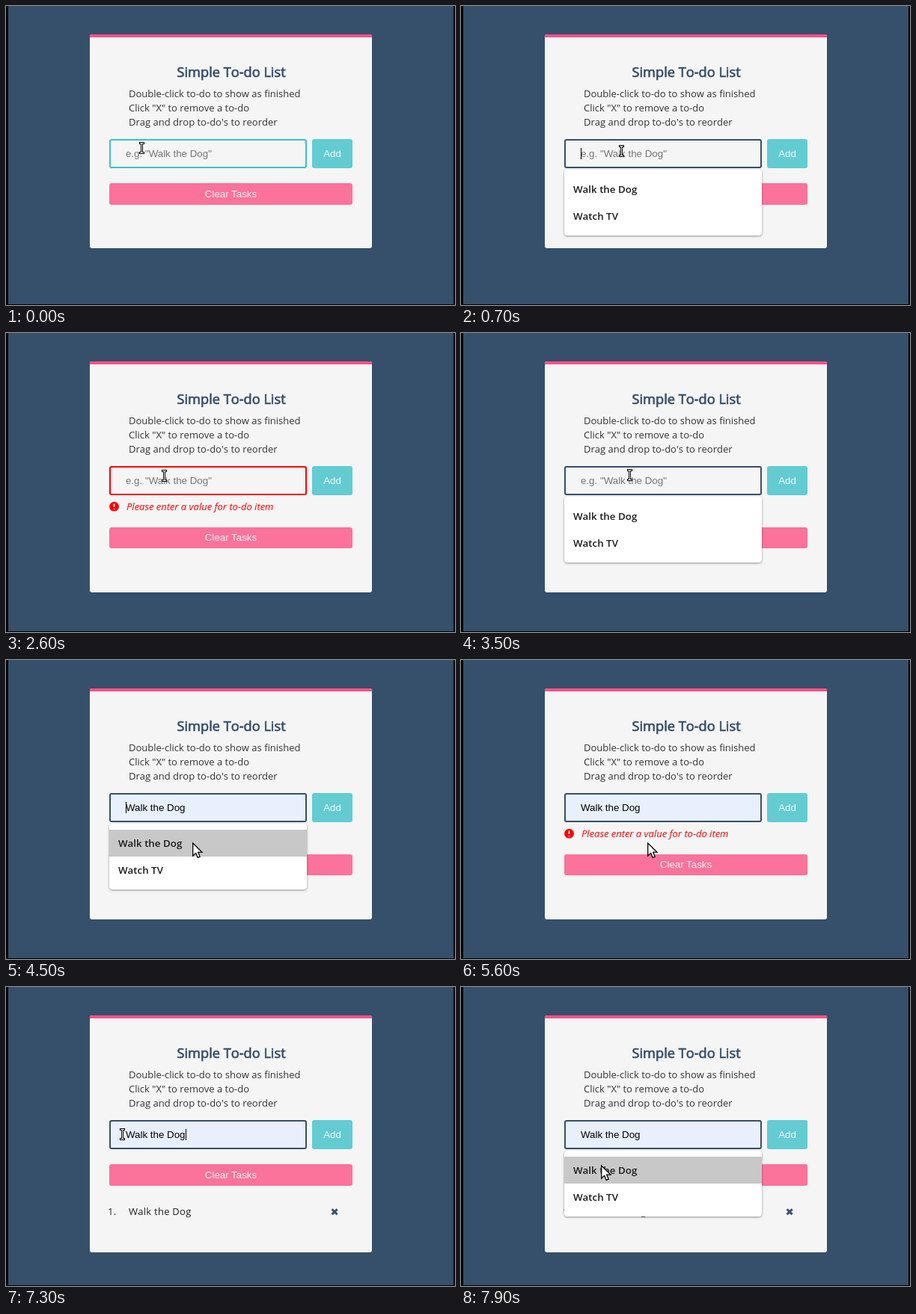
Animation of 600 by 400 pixels, one loop 8 s. Source, as an HTML page:

```html
<!DOCTYPE html>
<html lang="en">
<head>
<meta charset="utf-8">
<title>Simple To-do List</title>
<style>
  html, body { margin: 0; width: 100%; height: 100%; overflow: hidden; background: #364f6b; }
  svg { display: block; width: 600px; height: 400px; }
  text { font: 13px "Open Sans", sans-serif; font-kerning: none; fill: #333; white-space: pre; }
  .title { font-size: 18.2px; fill: #364f6b; stroke: #364f6b; stroke-width: .7px; }
  .control { font: 13.333px "Liberation Sans", Arial, sans-serif; font-kerning: auto; }
  .light { fill: #f5f5f5; text-anchor: middle; }
  .error { font-style: italic; fill: #f00; }
  .item { letter-spacing: .26px; fill: #222; }
  #popup text { font-size: 13.333px; font-weight: 600; fill: #1c1c1c; }
  #panel { filter: drop-shadow(0 1px 1.5px rgba(0, 0, 0, .4)); }
</style>
</head>
<body>
<svg viewBox="0 0 600 400">
  <rect width="600" height="400"/>
  <rect x="3" width="595" height="399" fill="#364f6b"/>

  <rect id="card" x="112" y="38" width="377" rx="3" fill="#f5f5f5"/>
  <path d="M112 42V41q0 -3 3 -3H486q3 0 3 3V42Z" fill="#fc5185"/>
  <text class="title" x="228.5" y="94.5">Simple To-do List</text>
  <text x="164" y="122">Double-click to-do to show as finished</text>
  <text x="164" y="141">Click "X" to remove a to-do</text>
  <text x="164" y="160">Drag and drop to-do's to reorder</text>

  <rect id="input" x="139" y="179" width="262" height="37" rx="2" stroke-width="2"/>
  <text id="value" class="control" x="160" y="202"></text>
  <rect id="caret" y="190" width="1" height="15"/>
  <rect x="409" y="178" width="54" height="39" rx="3" fill="#63cbd2"/>
  <text class="control light" x="436" y="202">Add</text>

  <g id="error">
    <circle cx="144.5" cy="232.2" r="6.4" fill="#f00"/>
    <path d="M144.5 228.6V232.8M144.5 235V236" stroke="#f5f5f5" stroke-width="2"/>
    <text class="error" x="161" y="237">Please enter a value for to-do item</text>
  </g>

  <rect id="clear" x="138" width="325" rx="3" fill="#fb729b"/>
  <text id="clearLabel" class="control light" x="300.5">Clear Tasks</text>

  <g id="task">
    <text class="item" x="136" y="305">1.</text>
    <text class="item" x="164" y="305">Walk the Dog</text>
    <path d="M435.6 297.2l7 7m0 -7l-7 7" stroke="#364f6b" stroke-width="3"/>
  </g>

  <g id="popup">
    <rect id="panel" x="138" y="219" width="264" height="88" rx="4" fill="#fff"/>
    <rect id="hover" x="138" y="227" width="264" height="36" fill="#c8c8c8"/>
    <text x="150" y="250">Walk the Dog</text>
    <text x="150" y="286">Watch TV</text>
  </g>

  <path id="arrow" d="M.7 1V18L4.7 14.3L7.2 20.4L10.2 19.1L7.7 13.1H13Z" fill="#fff" stroke="#000" stroke-width="1.3"/>
  <g id="beam" fill="none" stroke-linecap="square">
    <path id="bar" d="M-2.5 -6.5h4m-2 0v13m-2 0h4" stroke="#000" stroke-width="3"/>
    <use href="#bar" id="core"/>
    <path d="M-2.5 -6.5h4m-2 0v13m-2 0h4" stroke="#fff" stroke-width="1"/>
  </g>
</svg>
<script>
const LOOP = 8000, STEP = 100, BLINK = 560;

// Moments of the story, in ms.
const FOCUS = 600, REJECT = 1100, BLUR = 1700, REFOCUS = 2900;
const PREVIEW = 4500, PICK = 5000, SUBMIT = 6000, REOPEN = 7500;

// Pointer moves: start, end, x, y.
const moves = [
  [0, 300, 215, 194],
  [1000, 1400, 151, 123],
  [2000, 2700, 214, 193],
  [2800, 3100, 226, 190],
  [4000, 4500, 249, 244],
  [5800, 6200, 267, 223],
  [6200, 6800, 62, 187],
  [7000, 7500, 178, 199],
  [7500, 7900, 187, 238]
];

const clamp = v => Math.min(1, Math.max(0, v));
const el = id => document.getElementById(id);
const set = (id, attrs) => {
  for (const name in attrs) el(id).setAttribute(name, attrs[name]);
};
const show = (id, on) => set(id, { visibility: on ? "visible" : "hidden" });

function pointer(t) {
  let x = 182, y = 190;
  for (const [from, to, toX, toY] of moves) {
    const k = Math.sin(clamp((t - from) / (to - from)) * Math.PI / 2);
    x += (toX - x) * k;
    y += (toY - y) * k;
  }
  return [Math.round(x), Math.round(y)];
}

// Fades over two steps at either end of the span.
const fade = (t, from, to) =>
  clamp((t - from + STEP) / (2 * STEP)) * clamp((to + STEP - t) / (2 * STEP));

function caretOn(t) {
  const focused = t >= FOCUS && t < BLUR || t >= REFOCUS;
  const reset = [FOCUS, REFOCUS, PREVIEW, PICK].filter(time => time <= t).pop();
  return focused && Math.floor((t - reset) / BLINK) % 2 === 0;
}

function draw(t) {
  const [x, y] = pointer(t);
  const open = fade(t, FOCUS, BLUR) + fade(t, REFOCUS, PICK + STEP) + fade(t, REOPEN, Infinity);
  const hovering = open > 0 && x >= 138 && y >= 227;
  const filled = hovering || t >= PICK;
  const added = t >= SUBMIT;
  const failed = t >= REJECT && !added;

  set("card", { height: added ? 317 : failed ? 309 : 286 });

  const border = t < FOCUS ? "#3fc1c9" : t >= BLUR && t < REFOCUS ? "#f00" : "#364f6b";
  set("input", { stroke: border, fill: filled ? "#e8f0fe" : "#f5f5f5" });
  el("value").textContent = filled ? "Walk the Dog" : 'e.g. "Walk the Dog"';
  el("value").style.fill = filled ? "#000" : "#757575";
  set("caret", { x: t < PICK ? 160 : 240 });
  show("caret", caretOn(t));

  show("error", failed);
  show("task", added);
  set("clear", { y: failed ? 260 : 237, height: failed ? 28 : 29 });
  set("clearLabel", { y: failed ? 278 : 256 });

  const scale = .955 + .045 * open;
  set("popup", {
    opacity: open,
    transform: `translate(270 263) scale(${scale}) translate(-270 -263)`
  });
  show("hover", hovering);

  const overInput = x >= 138 && x <= 402 && y >= 178 && y <= 217;
  const overText = x >= 164 && x <= 393 && y >= 108 && y <= 165;
  const place = { transform: `translate(${x} ${y})` };
  set("arrow", place);
  set("beam", place);
  show("beam", overInput || overText);
  show("arrow", !overInput && !overText);
}

const start = performance.now();
function tick() {
  const elapsed = (performance.now() - start) % LOOP;
  draw(Math.floor(elapsed / STEP) * STEP);
  requestAnimationFrame(tick);
}
tick();
</script>
</body>
</html>
```
